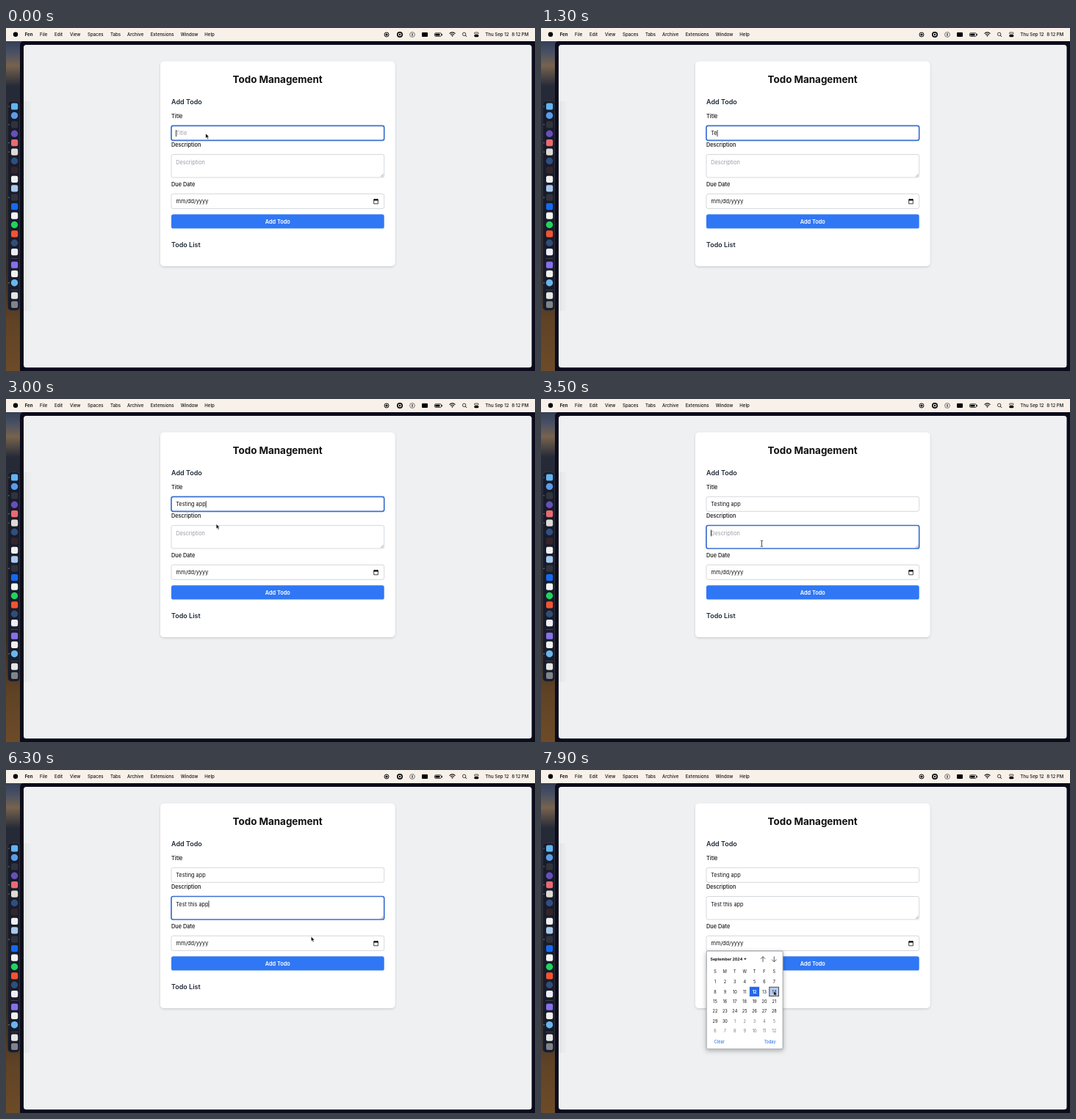
Animation, 720 px wide and 468 px high, one loop 8000 ms. Source, as an HTML page:

```html
<!DOCTYPE html>
<html lang="en">
<head>
<meta charset="utf-8">
<title>Todo Management</title>
<style>
  html, body { margin: 0; width: 720px; height: 468px; overflow: hidden; }
  svg { display: block; }
  text { font: 7.35px Inter, sans-serif; fill: #111; white-space: pre; }
  .menu text { font-size: 6.1px; font-weight: 500; }
  .label { font-weight: 500; }
  .heading { font-size: 9px; font-weight: 600; fill: #1f2937; }
  .field { fill: #fff; stroke: #d5d8dd; }
  .field.focus { stroke: #3a70d2; stroke-width: 1.7; }
  .placeholder { fill: #9a9ea6; }
  .mid { text-anchor: middle; }
  #popup text { font-size: 5.6px; }
</style>
</head>
<body>
<svg width="720" height="468" viewBox="0 0 720 468">
  <defs>
    <linearGradient id="wall" x2="0" y2="1">
      <stop stop-color="#1d2c45"/>
      <stop offset=".07" stop-color="#485064"/>
      <stop offset=".11" stop-color="#77634d"/>
      <stop offset=".17" stop-color="#252a38"/>
      <stop offset=".7" stop-color="#33281f"/>
      <stop offset=".85" stop-color="#5f4225"/>
      <stop offset="1" stop-color="#6d4b28"/>
    </linearGradient>
    <linearGradient id="shade">
      <stop stop-color="#000" stop-opacity=".05"/>
      <stop offset="1" stop-color="#000" stop-opacity="0"/>
    </linearGradient>
    <filter id="soft" x="-20%" y="-20%" width="140%" height="140%">
      <feDropShadow dx="0" dy="1.2" stdDeviation="1.4" flood-opacity=".16"/>
    </filter>
    <filter id="deep" x="-20%" y="-20%" width="140%" height="140%">
      <feDropShadow dx="0" dy="2" stdDeviation="3" flood-opacity=".3"/>
    </filter>
  </defs>

  <rect width="720" height="468" fill="url(#wall)"/>
  <rect x="19" y="18" width="710" height="460" rx="5" fill="#0c0b1b"/>
  <rect x="24" y="23" width="691.5" height="440.3" rx="3.5" fill="#eef0f2"/>
  <rect x="24" y="100" width="12" height="286" fill="url(#shade)"/>
  <g id="dock"><rect x="2.3" y="99.5" width="16.4" height="286" rx="5" fill="#181c2a" stroke="#424654" stroke-width=".5"/></g>

  <g class="menu" id="menu">
    <rect width="720" height="18" fill="#f8f1ea"/>
    <circle cx="13" cy="8.8" r="3.2"/>
    <g fill="none" stroke="#111">
      <circle cx="518" cy="9" r="3"/>
      <circle cx="536" cy="9" r="3.2" stroke-width="1.7"/>
      <circle cx="553" cy="9" r="3.4" stroke="#77736f"/>
      <rect x="583.5" y="6.8" width="9" height="4.6" rx="1.3" stroke-width=".8"/>
      <path d="M603.5 7.6q4-3.5 8 0M605 9.3q2.5-2 5 0" stroke-width="1.1"/>
      <circle cx="623.6" cy="8.4" r="2.2" stroke-width=".8"/>
      <path d="M625.2 10l2 2" stroke-width=".9"/>
      <rect x="637.5" y="6" width="5.5" height="2.2" rx="1.1" stroke-width=".7"/>
    </g>
    <circle cx="518" cy="9" r="1.6"/>
    <circle cx="536" cy="9" r="1.2"/>
    <rect x="552" y="7.2" width="2" height="3.6" fill="#77736f"/>
    <rect x="566" y="6" width="8" height="6" rx="1"/>
    <rect x="584.4" y="7.7" width="6" height="2.8" rx=".6"/>
    <path d="M593.2 8v2.2h.8v-2.2zM606.2 10.3l1.3 1.5 1.3-1.5q-1.3-1-2.6 0z"/>
    <rect x="637.2" y="9.3" width="6.2" height="2.9" rx="1.4"/>
  </g>

  <rect x="210" y="45.5" width="319.5" height="279.5" rx="5" fill="#fff" filter="url(#soft)"/>
  <text class="mid" x="369.7" y="74.8" style="font-size:13.4px;font-weight:700">Todo Management</text>
  <text class="heading" x="225" y="103.5">Add Todo</text>
  <text class="label" x="225" y="122.8">Title</text>
  <text class="label" x="225" y="162.2">Description</text>
  <text class="label" x="225" y="215.5">Due Date</text>
  <text class="heading" x="225" y="299">Todo List</text>

  <rect class="field" id="titleBox" x="225" y="133.3" width="289.7" height="20" rx="2.6"/>
  <text id="titleText" x="231.2" y="146.3"></text>
  <rect class="field" id="descBox" x="225" y="172.5" width="289.7" height="31.5" rx="2.6"/>
  <path d="M510 203l3.7-3.7M512 203l1.7-1.7" stroke="#777" stroke-width=".6"/>
  <text id="descText" x="231.2" y="185.6"></text>
  <rect class="field" x="225" y="226.3" width="289.7" height="20.2" rx="2.6"/>
  <text x="231.6" y="239.4">mm/dd/yyyy</text>
  <path d="M500.7 234.2h5.6v5.6h-5.6z" fill="none" stroke="#111" stroke-width=".8"/>
  <path d="M500.5 233.6h6v1.8h-6zM501.3 232.9h1v1h-1zM504.7 232.9h1v1h-1z"/>
  <rect id="button" x="225" y="254.3" width="289.7" height="19.3" rx="2.6"/>
  <text class="mid" x="369.8" y="266.8" style="font-weight:600;fill:#fff">Add Todo</text>
  <rect id="caret" width=".8" height="9" fill="#111"/>

  <g id="popup">
    <rect x="225.2" y="247" width="104" height="133.7" rx="1" fill="#fff" stroke="#8b8d91" stroke-width=".8" filter="url(#deep)"/>
    <text x="230.4" y="259.8" style="font-size:5.35px;font-weight:700">September 2024</text>
    <path d="M276.2 257h3.4l-1.7 2z"/>
    <path d="M302 262v-7.4m-3.2 3.2l3.2-3.2 3.2 3.2M317.3 254.4v7.4m-3.2-3.2l3.2 3.2 3.2-3.2" fill="none" stroke="#333" stroke-width=".8"/>
    <rect x="283.9" y="295.8" width="13.2" height="13.2" fill="#2568e8"/>
    <rect id="hoverDay" x="310.8" y="296.2" width="12.6" height="12.4" fill="#b4ccf6" stroke="#222" stroke-width=".8"/>
    <text x="235.8" y="372.8" style="fill:#1a68e0">Clear</text>
    <text x="303.4" y="372.8" style="fill:#1a68e0">Today</text>
  </g>

  <path id="arrow" d="M0 0v6.3l1.5-1.3 1.1 2.5 1.2-.5-1.1-2.4h2z" fill="#000" stroke="#fff" stroke-width=".5"/>
  <path id="beam" d="M-1.6-4.2q1.6 0 1.6 1v6.4q0 1-1.6 1M1.6-4.2q-1.6 0-1.6 1M0 3.2q0 1 1.6 1" fill="none" stroke="#222" stroke-width=".8"/>
</svg>
<script>
const $ = id => document.getElementById(id);
const add = (parent, tag, attrs, text = '') => {
  const el = document.createElementNS('http://www.w3.org/2000/svg', tag);
  for (const name in attrs) el.setAttribute(name, attrs[name]);
  el.textContent = text;
  return $(parent).appendChild(el);
};
const show = (id, on) => $(id).style.display = on ? '' : 'none';

// Menu bar
const menuItems = { Fen: 25.7, File: 46, Edit: 66, View: 87, Spaces: 111, Tabs: 142, Archive: 165,
  Extensions: 196.7, Window: 237.7, Help: 270.3, 'Thu Sep 12': 652.3, '8:12 PM': 688.2 };
for (const [name, x] of Object.entries(menuItems))
  add('menu', 'text', { x, y: 11, style: name === 'Fen' ? 'font-weight:700' : '' }, name);

// Dock: o = circle, otherwise a rounded square
const dockIcons = ['#62b4f2', 'o#5b9ce8', '#30333b', 'o#6750b8', '#e86b72', '#dedbd4', 'o#304f80', '#35252a',
  '#f1f1f1', '#a9c9eb', '#30333b', '#1769ee', '#f4f4f4', 'o#20d45f', '#f15432', 'o#304e77', '#eeeef9',
  '#8770e8', '#f1f1ee', 'o#69b6ee', '#e6e6e3', '#80848a'];
dockIcons.forEach((icon, i) => {
  const y = 107 + i * 12.42 + (i > 16 ? 5.3 : 0) + (i > 19 ? 5.3 : 0) - (i > 16 ? .2 * (i - 16) : 0);
  if (icon[0] === 'o') add('dock', 'circle', { cx: 11.5, cy: y, r: 4.7, fill: icon.slice(1) });
  else add('dock', 'rect', { x: 7, y: y - 4.6, width: 9.2, height: 9.2, rx: 2.2, fill: icon });
  if ([0, 2, 4, 5, 10, 19].includes(i)) add('dock', 'circle', { cx: 4, cy: y, r: .6, fill: '#bbb' });
});
for (const y of [314.5, 357.5])
  add('dock', 'path', { d: `M6.5 ${y}h10`, stroke: '#555967', 'stroke-width': .6 });

// Calendar
const column = i => 237 + (i % 7) * 13.4;
[...'SMTWTFS'].forEach((day, i) => add('popup', 'text', { class: 'mid', x: column(i), y: 277.3 }, day));
for (let i = 0; i < 42; i++) {
  const style = i > 29 ? 'fill:#777' : i === 11 ? 'fill:#fff;font-weight:700' : '';
  add('popup', 'text', { class: 'mid', x: column(i), y: 291.2 + Math.floor(i / 7) * 13.4, style }, i % 30 + 1);
}

const fields = [
  { id: 'title', hint: 'Title', text: 'Testing app', focus: 0, blur: 3200, y: 139.2,
    keys: [1100, 1300, 1450, 1600, 1700, 1850, 1950, 2100, 2300, 2450, 2600] },
  { id: 'desc', hint: 'Description', text: 'Test this app', focus: 3200, blur: 7000, y: 178.4,
    keys: [4100, 4300, 4700, 4900, 5200, 5350, 5540, 5570, 5600, 5800, 5900, 6000, 6100] }
];
const pointerPath = [[0, 271.8, 144], [2800, 271.8, 144], [3200, 300.5, 197.3], [6150, 300.5, 197.3],
  [6300, 415.3, 227.3], [6700, 504.5, 239.2], [7300, 504.5, 239.2], [7500, 490, 262],
  [7600, 440, 276], [7700, 370, 291], [7800, 326, 300], [7900, 316.8, 301.6], [8000, 316.8, 301.6]];

function pointerAt(t) {
  const i = pointerPath.findIndex(p => p[0] > t);
  const [t0, x0, y0] = pointerPath[i - 1], [t1, x1, y1] = pointerPath[i];
  const k = (t - t0) / (t1 - t0), ease = k * k * (3 - 2 * k);
  return [x0 + (x1 - x0) * ease, y0 + (y1 - y0) * ease];
}

function drawField({ id, hint, text, focus, blur, y, keys }, t) {
  const typed = keys.filter(key => key <= t).length;
  const focused = t >= focus && t < blur;
  const label = $(id + 'Text');
  label.textContent = typed ? text.slice(0, typed) : hint;
  label.setAttribute('class', typed ? '' : 'placeholder');
  $(id + 'Box').classList.toggle('focus', focused);
  if (!focused) return;
  const lastInput = typed ? keys[typed - 1] : focus;
  $('caret').setAttribute('x', 231.2 + (typed ? label.getComputedTextLength() : 0));
  $('caret').setAttribute('y', y);
  show('caret', (t - lastInput) % 1000 < 500);
}

function draw() {
  const t = Math.floor(performance.now() % 8000 / 100) * 100;
  show('caret', false);
  fields.forEach(field => drawField(field, t));
  show('popup', t >= 7200);
  show('hoverDay', t >= 7800);

  const [x, y] = pointerAt(t);
  const visible = t < 1100 || t >= 2800 && t < 4100 || t >= 6200;
  const overText = t >= 3100 && t < 4100;
  show('arrow', visible && !overText);
  show('beam', visible && overText);
  for (const id of ['arrow', 'beam']) $(id).setAttribute('transform', `translate(${x} ${y})`);
  $('button').setAttribute('fill', y > 254 && y < 273.6 ? '#2563eb' : '#3077f5');
  requestAnimationFrame(draw);
}
draw();
</script>
</body>
</html>
```
